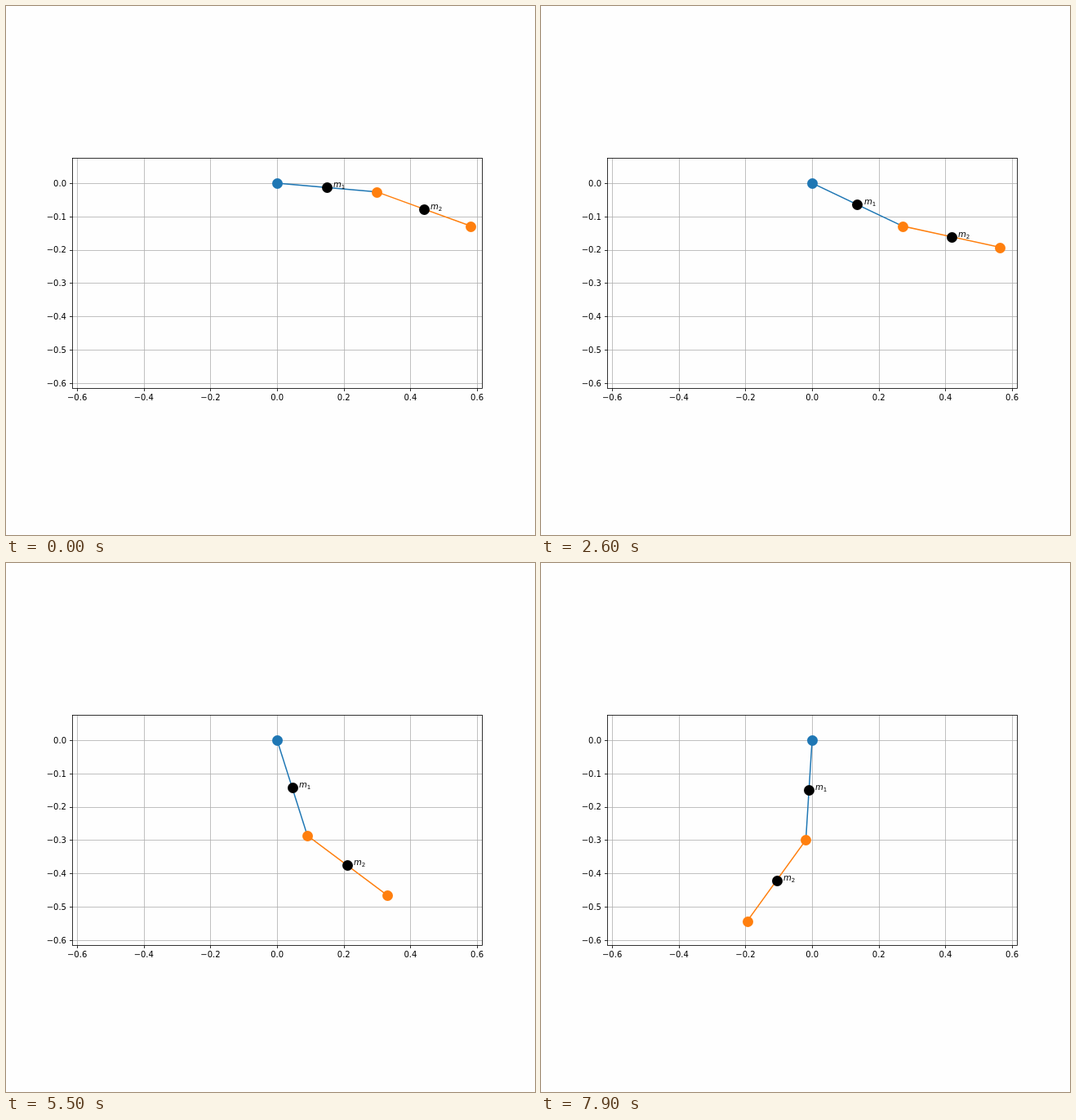
These frames come from a looping animation (648x648 px, 8000 ms). An HTML page:

```html
<!DOCTYPE html>
<html lang="en">
<head>
<meta charset="utf-8">
<title>Double pendulum</title>
<style>
  html, body { margin: 0; width: 100%; height: 100%; overflow: hidden; background: #fefefe; }
  svg { display: block; width: 648px; height: 648px; }
  text { font: 10px "DejaVu Sans", sans-serif; }
  .grid { stroke: #b0b0b0; stroke-width: .8; }
  .axis { stroke: #000; stroke-width: .8; fill: none; }
  .rod { stroke-width: 1.5; stroke-linecap: square; }
  .x { text-anchor: middle; }
  .y { text-anchor: end; }
  .mass { font-style: italic; }
  .sub { font-size: 7px; font-style: normal; }
</style>
</head>
<body>
<svg viewBox="0 0 648 648">
  <g id="back"></g>
  <g id="arms"></g>
  <g id="front"></g>
</svg>
<script>
const BLUE = '#1f77b4', ORANGE = '#ff7f0e';
const LEFT = 81, RIGHT = 583.2, TOP = 186.38, BOTTOM = 468.1;
const X0 = 332.1, Y0 = 217, SCALE = 408.29;
const LENGTH = 0.3, GRAVITY = 9.81;
const STEP_MS = 100, STEPS = 80, STEP_SECONDS = 0.005, SUBSTEPS = 5;

const px = x => X0 + x * SCALE;
const py = y => Y0 - y * SCALE;
const snap = v => Math.floor(v + 0.5) + 0.5;

function add(parent, tag, attrs, text) {
  const el = document.createElementNS('http://www.w3.org/2000/svg', tag);
  set(el, attrs);
  if (text) el.textContent = text;
  (typeof parent === 'string' ? document.getElementById(parent) : parent).append(el);
  return el;
}
function set(el, attrs) {
  for (const key in attrs) el.setAttribute(key, attrs[key]);
}
const line = (parent, cls, x1, y1, x2, y2) => add(parent, 'line', { class: cls, x1, y1, x2, y2 });
const dot = fill => add('arms', 'circle', { r: 6.5, fill });
const place = (el, [x, y]) => set(el, { cx: snap(x), cy: snap(y) });
const label = v => v.toFixed(1).replace('-', '\u2212');

// Axes
for (let i = -3; i <= 3; i++) {
  const x = snap(px(i / 5));
  line('back', 'grid', x, TOP, x, BOTTOM);
  line('front', 'axis', x, 468.5, x, 472);
  add('front', 'text', { class: 'x', x: px(i / 5), y: 483 }, label(i / 5));
}
for (let i = 0; i <= 6; i++) {
  const v = i ? -i / 10 : 0, y = snap(py(v));
  line('back', 'grid', LEFT, y, RIGHT, y);
  line('front', 'axis', 78, y, 81.5, y);
  add('front', 'text', { class: 'y', x: 74, y: Math.round(py(v) + 3.8) }, label(v));
}
add('front', 'rect', {
  class: 'axis', x: snap(LEFT), y: snap(TOP),
  width: snap(RIGHT) - snap(LEFT), height: snap(BOTTOM) - snap(TOP)
});

// Two equal uniform rods; angles are measured downwards from the horizontal.
function derive([a, b, u, v]) {
  const g = GRAVITY / LENGTH, s = Math.sin(a - b), c = Math.cos(a - b) / 2;
  const p = 1.5 * g * Math.cos(a) - 0.5 * s * v * v;
  const q = 0.5 * g * Math.cos(b) + 0.5 * s * u * u;
  const det = 4 / 9 - c * c;
  return [u, v, (p / 3 - c * q) / det, (4 / 3 * q - c * p) / det];
}
function advance(state, h) {
  const shift = (k, f) => state.map((n, i) => n + k[i] * f);
  const k1 = derive(state);
  const k2 = derive(shift(k1, h / 2));
  const k3 = derive(shift(k2, h / 2));
  const k4 = derive(shift(k3, h));
  return state.map((n, i) => n + h / 6 * (k1[i] + 2 * k2[i] + 2 * k3[i] + k4[i]));
}
const poses = [];
let state = [5 * Math.PI / 180, 20 * Math.PI / 180, 0, 0];
for (let i = 0; i < STEPS; i++) {
  poses.push(state);
  for (let j = 0; j < SUBSTEPS; j++) state = advance(state, STEP_SECONDS / SUBSTEPS);
}

// Pendulum
const rods = [BLUE, ORANGE].map(stroke => add('arms', 'line', { class: 'rod', stroke }));
const [pivot, joint, tip, ...masses] = [BLUE, ORANGE, ORANGE, '#000', '#000'].map(dot);
const names = [1, 2].map(n => {
  const g = add('front', 'g', {});
  add(g, 'text', { class: 'mass' }, 'm');
  add(g, 'text', { class: 'sub', x: 9.7, y: 1.6 }, String(n));
  return g;
});
const origin = [X0, Y0];
place(pivot, origin);

function extend([x, y], angle) {
  const r = LENGTH * SCALE;
  return [x + r * Math.cos(angle), y + r * Math.sin(angle)];
}
function draw(step) {
  const [a, b] = poses[step];
  const mid = extend(origin, a), end = extend(mid, b);
  place(joint, mid);
  place(tip, end);
  [[origin, mid], [mid, end]].forEach(([p, q], i) => {
    const x = (p[0] + q[0]) / 2, y = (p[1] + q[1]) / 2;
    set(rods[i], { x1: p[0], y1: p[1], x2: q[0], y2: q[1] });
    place(masses[i], [x, y]);
    set(names[i], { transform: `translate(${Math.round(x + 0.02 * SCALE)} ${Math.round(y)})` });
  });
}

const start = performance.now();
function tick() {
  draw(Math.floor((performance.now() - start) / STEP_MS) % STEPS);
  requestAnimationFrame(tick);
}
tick();
</script>
</body>
</html>
```
